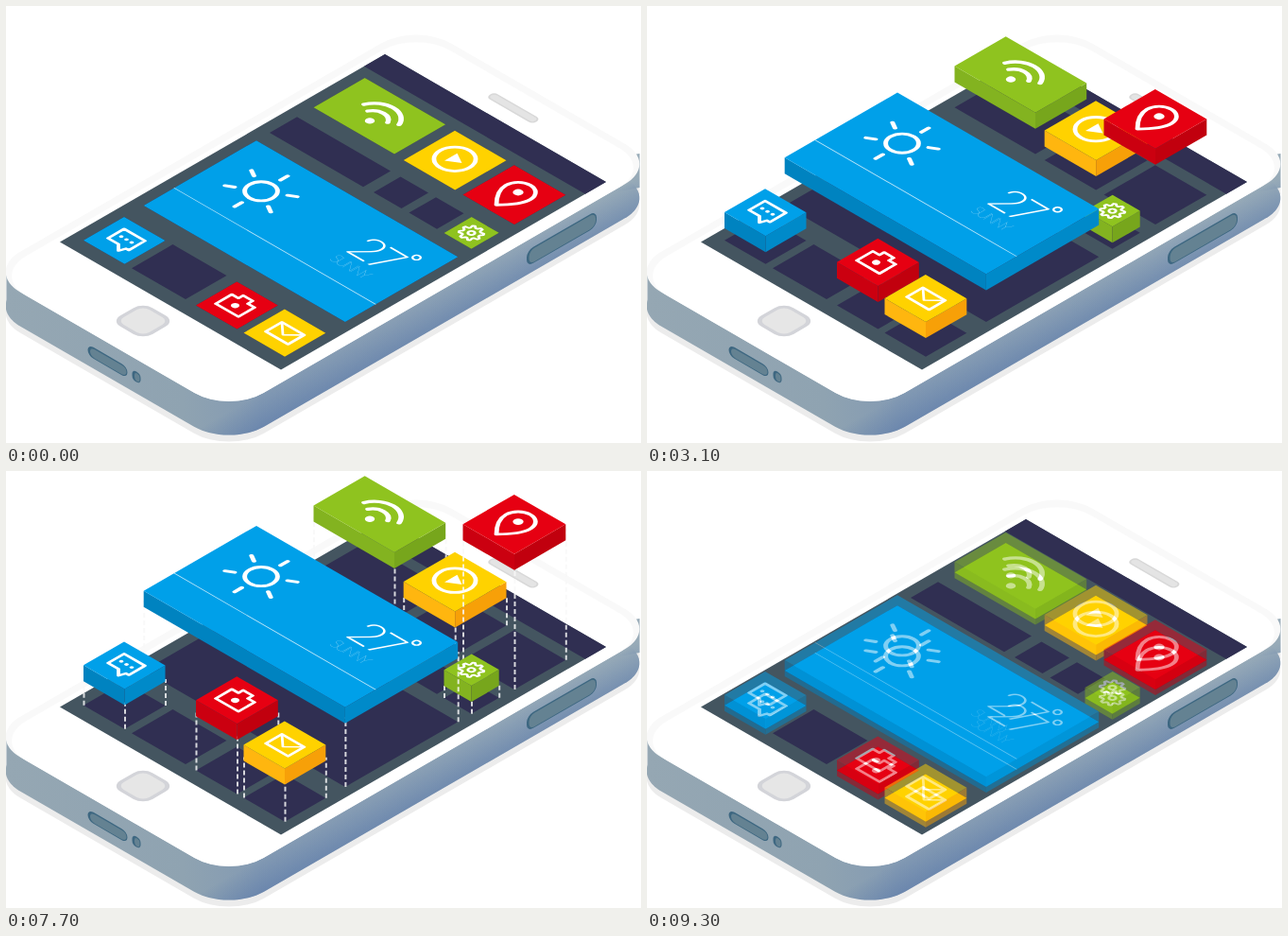
An HTML page that plays this animation: 672x462 px, repeating every 9.4 s.

```html
<!DOCTYPE html>
<html lang="en">
<head>
<meta charset="utf-8">
<title>Phone tiles</title>
<style>
  html, body { margin: 0; width: 100%; height: 100%; overflow: hidden; background: #fff; }
  svg { display: block; }
  text { font-family: Lato, "Open Sans", sans-serif; fill: #fff; stroke: none; }
  .temp { font-size: 40px; font-weight: 300; letter-spacing: -4px; }
  .sky { font-size: 14px; font-weight: 100; letter-spacing: -2.2px; }
  .icon { fill: none; stroke: #fff; stroke-linecap: round; stroke-linejoin: round; }
  .dot { fill: #fff; stroke: none; }
  .dash { stroke: #f8f8f8; stroke-width: 2; stroke-dasharray: 5 3; }
</style>
</head>
<body>
<svg id="stage" width="672" height="462" viewBox="0 0 672 462">
  <defs>
    <linearGradient id="wall" gradientUnits="userSpaceOnUse" x1="0" y1="0" x2="672" y2="0">
      <stop offset="0" stop-color="#95a7b3"/>
      <stop offset=".28" stop-color="#8fa3b1"/>
      <stop offset=".4" stop-color="#839ab3"/>
      <stop offset="1" stop-color="#98abb8"/>
    </linearGradient>
    <linearGradient id="shade" gradientUnits="userSpaceOnUse" x1="447" y1="308" x2="463" y2="336">
      <stop offset="0" stop-color="#5474a8" stop-opacity="0"/>
      <stop offset="1" stop-color="#5474a8" stop-opacity=".5"/>
    </linearGradient>
  </defs>
</svg>
<script>
const K = 0.577, OX = 401, OY = 51;
const THICK = 17, REST = 17, STEPS = 11, LOOP = 9400;
const PLANE = `matrix(1 ${K} -1 ${K} ${OX} ${OY})`;
const DARK = '#302f52', SLATE = '#445560';

// Screen-plane coordinates to stage pixels
const iso = (p, q, dy = 0) => [OX + p - q, OY + K * (p + q) + dy];
const rect = (x, y, w, h, fill, r = 0) =>
  `<rect x="${x}" y="${y}" width="${w}" height="${h}" rx="${r}" fill="${fill}"/>`;
const poly = (pts, fill) => `<polygon points="${pts.join(' ')}" fill="${fill}"/>`;
const plane = body => `<g transform="${PLANE}">${body}</g>`;
const dot = (x, y, r) => `<circle class="dot" cx="${x}" cy="${y}" r="${r}"/>`;
const ring = (x, y, r) => `<circle cx="${x}" cy="${y}" r="${r}"/>`;
const path = (d, attrs = '') => `<path d="${d}" ${attrs}/>`;
const icon = (width, body) => `<g class="icon" stroke-width="${width}">${body}</g>`;

// Top, left side, right side
const GREEN = ['#8fc31f', '#83b320', '#77a61c'];
const YELLOW = ['#ffd200', '#ffb60f', '#f7a008'];
const RED = ['#e60012', '#cb0010', '#c1000e'];
const BLUE = ['#00a0e9', '#0083c0', '#008ac9'];

function sunRays() {
  let d = '';
  for (let a = 30; a < 390; a += 60) {
    const c = Math.cos(a * Math.PI / 180), s = Math.sin(a * Math.PI / 180);
    d += `M${60 + 20.5 * c} ${191 + 20.5 * s}L${60 + 28 * c} ${191 + 28 * s}`;
  }
  return path(d);
}

function cog(x, y) {
  const pts = [];
  for (let i = 0; i < 32; i++) {
    const a = (i + 0.5) * Math.PI / 16, r = i % 4 < 2 ? 9.4 : 6.9;
    pts.push([x + r * Math.cos(a), y + r * Math.sin(a)]);
  }
  return path('M' + pts.join('L') + 'Z');
}

const icons = {
  wifi: icon(4, path('M35 57A20 20 0 0 1 72 57M43 61A12 12 0 0 1 64 61') + dot(53, 69, 3.7)),
  play: icon(3.4, ring(133, 59, 15.6) + path('M129 52.5V66L140.5 59Z', 'class="dot"')),
  pin: icon(3.4, path('M197 79C190 72 184 64 184 56a13 13 0 0 1 26 0C210 64 204 72 197 79Z') + dot(197, 56, 4)),
  gear: icon(2.1, cog(209.5, 118) + ring(209.5, 118, 2.6)),
  weather: icon(3.5, ring(60, 191, 12.3) + sunRays()) +
    icon(0.8, path('M11 234H224', 'opacity=".75"')) +
    icon(1.8, ring(203, 169.5, 3)) +
    '<text class="temp" x="158" y="201.5">27</text><text class="sky" x="158" y="217.5">SUNNY</text>',
  chat: icon(2.7, path('M22 298H44V315H41L39 321L33 315H22Z') +
    dot(27.5, 306.5, 1.7) + dot(33, 306.5, 1.7) + dot(38.5, 306.5, 1.7)),
  camera: icon(2.7, path('M139 301H146V296H156V301H163V318H139Z') + dot(151, 309.5, 3.2)),
  mail: icon(2.7, path('M191 300H214.5V317H191Z') + path('M191 300L203 311L214.5 300', 'stroke-width="2"'))
};

// Listed back to front; top is the highest lift
const tiles = [
  { name: 'wifi', box: [11, 32.3, 85.5, 54.2], tone: GREEN, top: 76 },
  { name: 'play', box: [107, 33, 54.5, 54.3], tone: YELLOW, top: 49 },
  { name: 'pin', box: [170, 33.2, 54.5, 54.3], tone: RED, top: 156 },
  { name: 'gear', box: [195, 103.3, 29, 29.2], tone: GREEN, top: 31 },
  { name: 'weather', box: [11, 147, 213.2, 119.3], tone: BLUE, top: 91 },
  { name: 'chat', box: [11, 287, 43.5, 43], tone: BLUE, top: 45 },
  { name: 'camera', box: [130, 286.7, 43.5, 43.3], tone: RED, top: 80 },
  { name: 'mail', box: [180.5, 286.7, 43.5, 43.3], tone: YELLOW, top: 60 }
];
const emptySlots = [[11, 104, 99, 29], [120.5, 104, 29.5, 28.5], [158, 104, 29.5, 28.5], [62, 286.5, 57, 43.5]];

const lid = t => plane(rect(...t.box, t.tone[0]) + icons[t.name]);
const corners = ([p, q, w, h]) => [[p, q + h], [p + w, q + h], [p + w, q]];

function block(t) {
  const [left, front, right] = corners(t.box);
  const side = (a, b, fill) =>
    poly([iso(...a), iso(...b), iso(...b, THICK), iso(...a, THICK)], fill);
  return side(left, front, t.tone[1]) + side(front, right, t.tone[2]) + lid(t);
}

function dashes(t) {
  return corners(t.box).map(c => {
    const [x, y] = iso(...c);
    return `<line class="dash" x1="${x + 0.5}" x2="${x + 0.5}" y1="${y}" y2="${y - t.top + THICK}"/>`;
  }).join('');
}

function phone() {
  const face = fill => plane(rect(-12, -45, 258, 456, fill, 37));
  const hull = (depth, fill) => {
    const ends = [[0.5, 281], [670.5, 156], [670.5, 156 + depth], [0.5, 281 + depth]];
    return poly(ends, fill) + `<g transform="translate(0 ${depth})">${face(fill)}</g>`;
  };
  // Gradient walls need stage coordinates, so the lower rim is traced by formula
  const rim = [];
  for (let i = 0; i <= 120; i++) {
    const a = i / 120 * 2 * Math.PI, c = Math.cos(a), s = Math.sin(a);
    rim.push(iso((c < 0 ? 25 : 209) + 37 * c, (s < 0 ? -8 : 374) + 37 * s, 36));
  }
  const ends = [[0.5, 281], [670.5, 156], [670.5, 192], [0.5, 317]];
  const walls = ['url(#wall)', 'url(#shade)'].map(f =>
    path(`M${rim.join('L')}Z`, `fill="${f}"`) + poly(ends, f)).join('');
  const slit = (x, y, slope, w, h, r) =>
    `<g transform="matrix(1 ${slope} 0 1 ${x} ${y})">` +
    rect(-w / 2, -h / 2, w, h, '#3d6781', r) +
    rect(-w / 2 + 2.5, -h / 2 + 1.5, w - 3.5, h - 2.5, '#648292', r - 1) + '</g>';
  const speaker = (width, color) =>
    path('M97 -18.6H137.5', `stroke="${color}" stroke-width="${width}" stroke-linecap="round"`);
  return hull(43, '#ececec') + walls + face('#f9f9f9') +
    plane(rect(-5, -38, 251, 449, '#fff', 36) +
      speaker(9, '#d8d8d8') + speaker(6, '#e4e4e4') +
      rect(99.4, 355.4, 34, 34, '#d3d4d9', 10) + rect(102.7, 358.7, 27.4, 27.4, '#e6e6e6', 7)) +
    slit(588, 246, -K, 74, 17, 7) + slit(107.5, 375.5, K, 42, 12, 6) + slit(138, 392, K, 9, 11, 4.5);
}

const display = plane(rect(0, 0, 234, 344, SLATE) + rect(0, 0, 234, 22, DARK) +
  emptySlots.concat(tiles.map(t => t.box)).map(b => rect(...b, DARK)).join(''));

document.getElementById('stage').insertAdjacentHTML('beforeend',
  phone() + display +
  `<g id="flat">${tiles.map(lid).join('')}</g><g id="raised">` +
  tiles.map(t => `<g class="guide">${dashes(t)}</g><g class="block">${block(t)}</g>`).join('') + '</g>');

const flat = document.getElementById('flat');
const raised = document.getElementById('raised');
const blocks = [...document.querySelectorAll('.block')];
const guides = [...document.querySelectorAll('.guide')];

// [from ms, opacity of raised tiles, lift at rest]
const fades = [
  [0, 0, 0], [2000, 0.5, 11], [2100, 0.75, 14], [2200, 1, REST],
  [9200, 0.75, 14], [9300, 0.5, 11]
];

function level(t) {
  const count = from => Math.max(0, Math.min(STEPS, Math.floor((t - from) / 100) + 1));
  return count(2700) - count(7700);
}

function draw(t) {
  const [, alpha, rest] = fades.filter(f => f[0] <= t).pop();
  const step = level(t);
  const guide = Math.max(0, (step - 5) / 6);
  flat.style.display = alpha < 1 ? '' : 'none';
  raised.style.display = alpha ? '' : 'none';
  raised.setAttribute('opacity', alpha);
  tiles.forEach((tile, i) => {
    const lift = rest + (tile.top - REST) * step / STEPS;
    blocks[i].setAttribute('transform', `translate(0 ${-lift})`);
    guides[i].setAttribute('opacity', guide);
  });
}

const start = performance.now();
function tick() {
  draw((performance.now() - start) % LOOP);
  requestAnimationFrame(tick);
}
tick();
</script>
</body>
</html>
```
